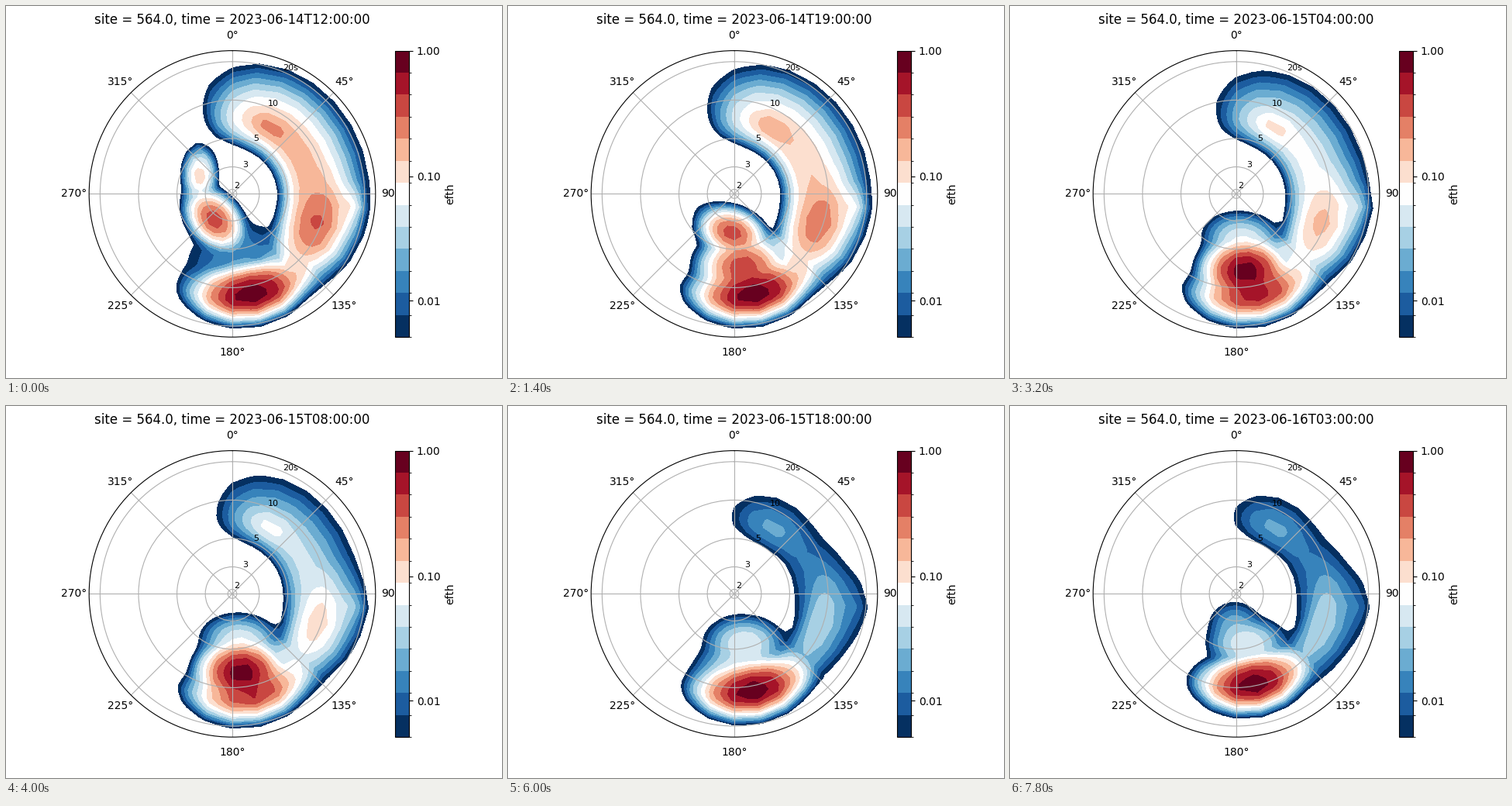
Recreate the animation shown at these times as a matplotlib script. Size 640 by 480 pixels, loop 8000 ms.

```python
import matplotlib.pyplot as plt
import numpy as np
from matplotlib.animation import FuncAnimation
from matplotlib.cm import ScalarMappable
from matplotlib.colors import BoundaryNorm, ListedColormap

FRAMES, INTERVAL = 40, 200
START = np.datetime64("2023-06-14T12")
CX, CY, RADIUS = 292, 242, 184.8
BANDS = 13

# Spectral grid: 12 degree sectors, log-spaced periods
deg = np.arange(0, 361, 12)
rad = np.linspace(0.5, RADIUS, 28)
D, R = np.meshgrid(deg, rad)
X = CX + R * np.sin(np.radians(D))
Y = CY - R * np.cos(np.radians(D))


def cap(level, distance):
    """Log-energy hill in colour bands, falling to zero at distance 1."""
    return level - np.maximum(abs(level), 3) * distance


def arc(level, bearing, radius, spread, inner, outer, power=2):
    """Swell that follows the compass, steeper towards short periods."""
    turn = (D - bearing + 180) % 360 - 180
    side = R - radius
    across = np.where(side > 0, np.abs(side / outer) ** 1.7,
                      np.abs(side / inner) ** 2.4)
    return cap(level, np.abs(turn / spread) ** power + across)


def patch(level, x, y, a, b, tilt=0):
    """Elliptical wind-sea patch on screen."""
    c, s = np.cos(np.radians(tilt)), np.sin(np.radians(tilt))
    u = (X - x) * c + (Y - y) * s
    v = (Y - y) * c - (X - x) * s
    return cap(level, (u / a) ** 2 + (v / b) ** 2)


def lerp(a, b, w):
    return a + (b - a) * w


def smooth(x):
    x = np.clip(x, 0, 1)
    return x * x * (3 - 2 * x)


def spectrum(h):
    """Energy of all wave systems after h hours, as a colour band number."""
    fade = min(h / 30, 1) ** 1.7
    shrink = fade ** 1.5
    drift = 1 - np.exp(-h / 9)
    lull = 1.8 * np.exp(-((h - 19) / 5) ** 2)
    mixing = np.exp(-((h - 16.5) / 15) ** 4)
    systems = [
        # northern crescent with its peak
        arc(lerp(8.5, 2, fade), 60, 100, lerp(81, 62, fade),
            lerp(42, 27, fade), lerp(77, 40, shrink), power=4),
        arc(lerp(9.2, 3, fade), 30, 100, 30, 28, 32),
        # eastern swell and its long-period shoulder
        arc(lerp(10.2, 4.8, fade), 109, 118, 48,
            lerp(56, 30, fade), lerp(58, 44, shrink)),
        patch(lerp(7, 2.2, fade), 441, 258, 26, 42),
        # southern swell
        arc(12.8 - lull, 169, 135 - max(h - 26, 0), 42, 50, 40),
        # decaying western sea, turning wind sea, mixed sea, late wind sea
        patch(7.6 - 1.1 * h, 250, 218 + 3 * h, 25, 42),
        patch(10.6 - 4.6 * smooth((h - 7) / 5), 269 + 38 * drift,
              275 + 32 * drift, 54, 37, 49 * (1 - drift)),
        patch(12.7 * mixing, 304, 334 + h / 2, 70, 54),
        patch(3.7 - (39 - h) / 2, 290, 283, 33, 30),
    ]
    total = sum(np.exp(s) for s in systems)
    return np.minimum(np.log(np.maximum(total, 1e-9)), BANDS - 0.01)


def period_radius(seconds):
    return 121 + 49.6 * np.log2(np.array(seconds) / 10)


fig = plt.figure(figsize=(6.4, 4.8), dpi=100)
ax = fig.add_subplot(projection="polar")
ax.set_theta_zero_location("N")
ax.set_theta_direction(-1)

colors = plt.get_cmap("RdBu_r")(np.linspace(0, 1, BANDS))
colors[BANDS // 2, :3] = 0.996
edges = np.arange(BANDS + 1)
cmap, norm = ListedColormap(colors), BoundaryNorm(edges, BANDS)

bar = fig.colorbar(ScalarMappable(norm, cmap), ax=ax, spacing="proportional")
efth = np.geomspace(0.005, 1, BANDS + 1)
marks = [0.01, 0.1, 1]
bar.set_ticks(np.interp(marks, efth, edges), labels=[f"{m:.2f}" for m in marks])
bar.set_ticks(edges, minor=True)
bar.set_label("efth")

periods = [2, 3, 5, 10, 20]
ax.set_ylim(0, RADIUS)
ax.set_rgrids(period_radius(periods), [str(p) for p in periods[:-1]] + ["20s"],
              angle=22.5, size=8)
title = ax.set_title("")
drawn = []


def update(i):
    while drawn:
        drawn.pop().remove()
    drawn.append(ax.contourf(np.radians(deg), rad, spectrum(i),
                             levels=edges, colors=colors))
    ax.set_ylim(0, RADIUS)
    text = str(START + np.timedelta64(i, "h"))
    text = text[:10] if text.endswith("T00") else text + ":00:00"
    title.set_text(f"site = 564.0, time = {text}")
    return drawn


anim = FuncAnimation(fig, update, frames=FRAMES, interval=INTERVAL,
                     init_func=lambda: update(0), repeat=True, repeat_delay=0)
plt.show()
```
